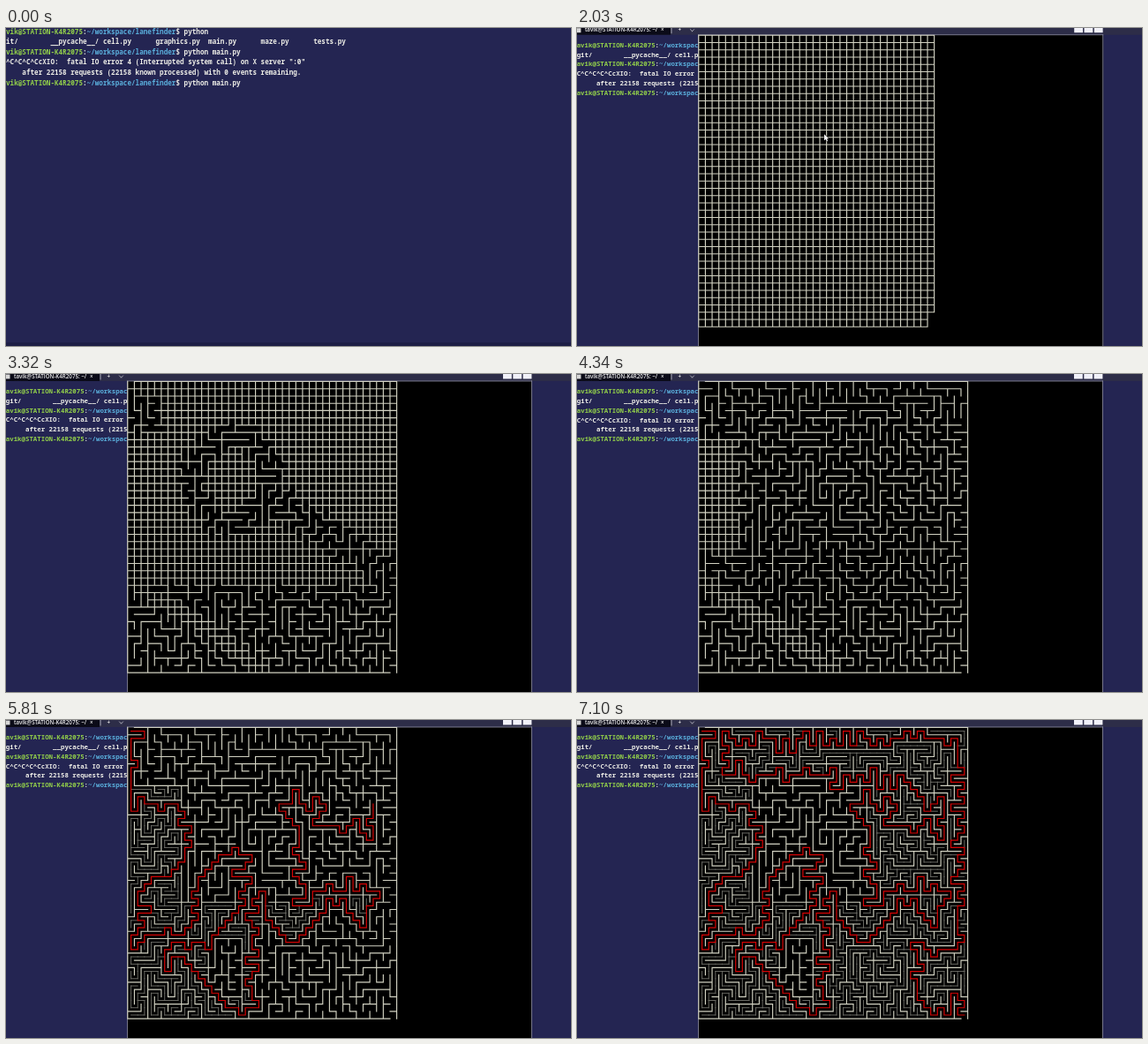
Write an HTML page with a canvas that moves like this. It is 640 by 360 pixels and loops after 7.13 s.

```html
<!DOCTYPE html>
<html lang="en">
<head>
<meta charset="utf-8">
<title>Maze</title>
<style>
  html, body { margin: 0; width: 100%; height: 100%; overflow: hidden; background: #242552; }
  canvas { display: block; width: 640px; height: 360px; }
</style>
</head>
<body>
<canvas id="stage" width="640" height="360"></canvas>
<script>
const ctx = document.getElementById('stage').getContext('2d');
const LOOP = 7130, N = 40, LAST = N * N - 1, STEPS = [1, -1, N, -N];
const DRAW = 458, BREAK = 2258, SOLVE = 4580;
const WINDOW_OPEN = 430, POINTER_GONE = 2300;

let seed = 7;
const random = () => (seed = (seed * 16807) % 2147483647) / 2147483647;
const pick = list => list[Math.floor(random() * list.length)];

// Cells are numbered column by column.
const id = (c, r) => c * N + r;
const col = i => Math.floor(i / N);
const row = i => i % N;
function step(i, d) {
  const c = col(i) + (Math.abs(d) === N ? Math.sign(d) : 0);
  const r = row(i) + (Math.abs(d) === 1 ? d : 0);
  return c < 0 || r < 0 || c >= N || r >= N ? -1 : id(c, r);
}

// Solution: walk between key points, cut off loops, then add random detours.
const keyPoints = [
  [0, 10], [8, 12], [6, 20], [1, 23], [1, 28], [10, 25], [13, 17], [17, 18],
  [12, 29], [5, 31], [14, 38], [20, 38], [18, 36], [18, 25], [23, 29], [29, 24],
  [35, 28], [37, 22], [25, 20], [22, 10], [28, 8], [27, 13], [36, 16], [36, 10],
  [30, 6], [3, 5], [3, 1], [38, 1], [38, 30], [32, 31], [34, 39], [39, 39]];
const path = [0];
for (const [c, r] of keyPoints) {
  for (let at = path[path.length - 1]; at !== id(c, r);) {
    const dc = c - col(at), dr = r - row(at);
    at += Math.abs(dc) >= Math.abs(dr) ? Math.sign(dc) * N : Math.sign(dr);
    const visited = path.indexOf(at);
    if (visited >= 0) path.length = visited;
    path.push(at);
  }
}
const seen = new Set(path);
for (let tries = 0; tries < 6000 && path.length < 600; tries++) {
  const i = Math.floor(random() * (path.length - 1));
  const a = path[i], b = path[i + 1];
  const side = (Math.abs(b - a) === 1 ? N : 1) * (random() < 0.5 ? -1 : 1);
  const detour = [step(a, side), step(b, side)];
  if (detour.some(v => v < 0 || seen.has(v))) continue;
  path.splice(i + 1, 0, ...detour);
  detour.forEach(v => seen.add(v));
}
const place = new Map(path.map((v, i) => [v, i]));
const middle = path.indexOf(id(36, 10));

// Side branches: 0 is never explored, 1 is explored early, 2 late.
function zone(i) {
  const c = col(i), r = row(i);
  if (c > 7 && c < 25 && r > 6 && r < 24 || c > 11 && c < 17 && r > 28 && r < 37) return 0;
  return c < 18 && r > 7 ? 1 : 2;
}
function fits(u, v) {
  if (!place.has(u)) return zone(u) === zone(v);
  return zone(v) === 0 || zone(v) === (place.get(u) > middle ? 2 : 1);
}
const parent = [], kids = Array.from({ length: N * N }, () => []);
function join(u, v) {
  parent[v] = u;
  kids[u].push(v);
  seen.add(v);
}
for (const strict of [true, false]) {
  const exits = u => STEPS.map(d => step(u, d))
    .filter(v => v >= 0 && !seen.has(v) && (!strict || fits(u, v)));
  for (;;) {
    const starts = [...seen].filter(u => exits(u).length);
    if (!starts.length) break;
    let u = pick(starts);
    for (let n = 0; n < 30; n++) {
      const free = exits(u);
      if (!free.length) break;
      const v = pick(free);
      join(u, v);
      u = v;
    }
  }
}
path.forEach((v, i) => i && join(path[i - 1], v));

// Walk the tree: the order of the cells and the moves of the search (-1 steps back).
const order = [];
let moves = [];
function visit(u, explored) {
  for (const v of kids[u]) {
    const shown = explored && (place.has(v) || zone(v) > 0);
    order.push(v);
    if (shown) moves.push(v);
    visit(v, shown);
    if (shown && !place.has(v)) moves.push(-1);
  }
}
visit(0, true);
moves = moves.slice(0, moves.indexOf(LAST) + 1);

// Walls fall first at the bottom, in a ring and in a band to its right; last on the left.
function phase(i) {
  const c = col(i), r = row(i);
  const slope = r - 0.6 * c;
  if (c < 6 && r > 7 && r < 24 || c < 21 && Math.abs(slope - 27) < 1.3) return 2;
  const ring = Math.abs(Math.hypot(c - 15, r - 13) - 6) < 1.8;
  const band = c > 18 && Math.abs(slope - 3) < 2.5;
  const corner = Math.hypot(c - 2, r - 4) < 3;
  return r > 27 || ring || band || corner ? 0 : 1;
}
order.sort((a, b) => phase(a) - phase(b));
const rank = [];
order.forEach((v, i) => rank[v] = i);
const upTo = p => order.filter(v => phase(v) <= p).length;

const carveStops = [[BREAK, 0], [3320, upTo(0)], [4340, upTo(1)], [SOLVE, order.length]];
const solveStops = [[SOLVE, 0], [5810, moves.indexOf(path[middle]) + 1], [7090, moves.length]];
function ramp(t, stops) {
  if (t <= stops[0][0]) return stops[0][1];
  for (let i = 1; i < stops.length; i++) {
    const [t0, n0] = stops[i - 1], [t1, n1] = stops[i];
    if (t < t1) return Math.floor(n0 + (n1 - n0) * (t - t0) / (t1 - t0));
  }
  return stops[stops.length - 1][1];
}

const X = c => 137.8 + c * 7.62;
const Y = r => 8.5 + r * 8.24;

function rect(color, x, y, w, h) {
  ctx.fillStyle = color;
  ctx.fillRect(x, y, w, h);
}
function strokeLines(color, width, lines) {
  ctx.beginPath();
  for (const [x0, y0, x1, y1] of lines) {
    ctx.moveTo(x0, y0);
    ctx.lineTo(x1, y1);
  }
  ctx.strokeStyle = color;
  ctx.lineWidth = width;
  ctx.lineCap = 'square';
  ctx.stroke();
}

const WHITE = '#ececе6'.replace('е', 'e'), BAR = '#2d2d48', USER = 'tavik@STATION-K4R2075';
const prompt = command => [
  ['#92cf4a', USER], [WHITE, ':'], ['#5aaedb', '~/workspace/lanefinder'], [WHITE, '$ ' + command]];
const files = ['.git/', '__pycache__/', 'cell.py', 'graphics.py', 'main.py', 'maze.py', 'tests.py'];
const terminal = [
  prompt('python'),
  [[WHITE, files.map(name => name.padEnd(13)).join('')]],
  prompt('python main.py'),
  [[WHITE, '^C^C^C^C^CcXIO:  fatal IO error 4 (Interrupted system call) on X server ":0"']],
  [[WHITE, '      after 22158 requests (22158 known processed) with 0 events remaining.']],
  prompt('python main.py')];

function drawTerminal() {
  rect(BAR, 0, -30, 640, 38);
  rect('#0b0b18', 0, -30, 106, 38);
  rect('#d8d8d8', 0, 0.5, 4.5, 5);
  ctx.textBaseline = 'middle';
  ctx.fillStyle = '#f0f0f0';
  ctx.font = '600 6.2px "Open Sans", "Noto Sans", sans-serif';
  ctx.fillText(USER + ': ~/', 9, 3);
  ctx.fillText('×', 95, 3);
  ctx.fillText('+', 114.5, 3);
  strokeLines('#c8c8d0', 0.8, [[107, 0, 107, 6], [128.5, 2, 130.5, 4], [130.5, 4, 132.5, 2]]);

  ctx.font = '600 7.42px "Noto Sans Mono", "DejaVu Sans Mono", monospace';
  terminal.forEach((parts, i) => {
    let x = -4.7;
    for (const [color, text] of parts) {
      ctx.fillStyle = color;
      ctx.fillText(text, x, 20 + i * 10.8);
      x += ctx.measureText(text).width;
    }
  });
}

function drawWindow() {
  rect(BAR, 137, -30, 459, 38);
  rect('#000', 137, 8, 459, 400);
  for (const x of [563, 574.3, 585.6]) rect('#f2f2fa', x, -8, 9.8, 13.5);
  strokeLines('#85859a', 0.9, [[137.5, 8, 137.5, 400], [595.5, 8, 595.5, 400], [137.5, 8, 595.5, 8]]);
}

function drawWalls(t) {
  const drawn = Math.min(N * N, Math.floor((t - DRAW) * 0.889));
  const carved = ramp(t, carveStops);
  const open = (i, j) => {
    if (j < 0) return t > BREAK && (i === 0 || i === LAST);
    const child = parent[i] === j ? i : parent[j] === i ? j : -1;
    return child >= 0 && rank[child] < carved;
  };
  const lines = [];
  for (let i = 0; i < drawn; i++) {
    const c = col(i), r = row(i);
    const x0 = X(c), x1 = X(c + 1), y0 = Y(r), y1 = Y(r + 1);
    // The outer left and right sides stay closed.
    if (c === 0 || !open(i, i - N)) lines.push([x0, y0, x0, y1]);
    if (c === N - 1 || !open(i, i + N)) lines.push([x1, y0, x1, y1]);
    if (!open(i, step(i, -1))) lines.push([x0, y0, x1, y0]);
    if (!open(i, step(i, 1))) lines.push([x0, y1, x1, y1]);
  }
  strokeLines('#d2d2c2', 1.15, lines);
}

function drawSearch(t) {
  const trail = [], undone = [];
  for (const v of moves.slice(0, ramp(t, solveStops))) {
    if (v < 0) undone.push(trail.pop());
    else trail.push(v);
  }
  const link = v => [v, parent[v]].flatMap(i => [X(col(i) + 0.5), Y(row(i) + 0.5)]);
  strokeLines('#6e6e68', 0.95, undone.map(link));
  strokeLines('#d40404', 1.2, trail.map(link));
}

function drawPointer() {
  ctx.beginPath();
  [[280, 120.5], [280, 127.5], [281.7, 126.1], [282.9, 128.6], [284, 128], [282.9, 125.6], [285, 125.3]]
    .forEach(([x, y]) => ctx.lineTo(x, y));
  ctx.closePath();
  ctx.fillStyle = '#fff';
  ctx.strokeStyle = '#000';
  ctx.lineWidth = 0.8;
  ctx.stroke();
  ctx.fill();
}

function frame() {
  const t = performance.now() % LOOP;
  // The view settles around a fixed point.
  const ease = Math.exp(-t / 500), zx = 0.031 * ease, zy = 0.074 * ease;
  ctx.setTransform(1, 0, 0, 1, 0, 0);
  rect('#242552', 0, 0, 640, 360);
  if (t < WINDOW_OPEN) rect('#1d1e45', 0, 356, 640, 4);
  ctx.setTransform(1 + zx, 0, 0, 1 + zy, -140 * zx, -233 * zy);
  drawTerminal();
  if (t >= WINDOW_OPEN) {
    drawWindow();
    drawWalls(t);
    drawSearch(t);
    if (t < POINTER_GONE) drawPointer();
  }
  requestAnimationFrame(frame);
}
frame();
</script>
</body>
</html>
```
